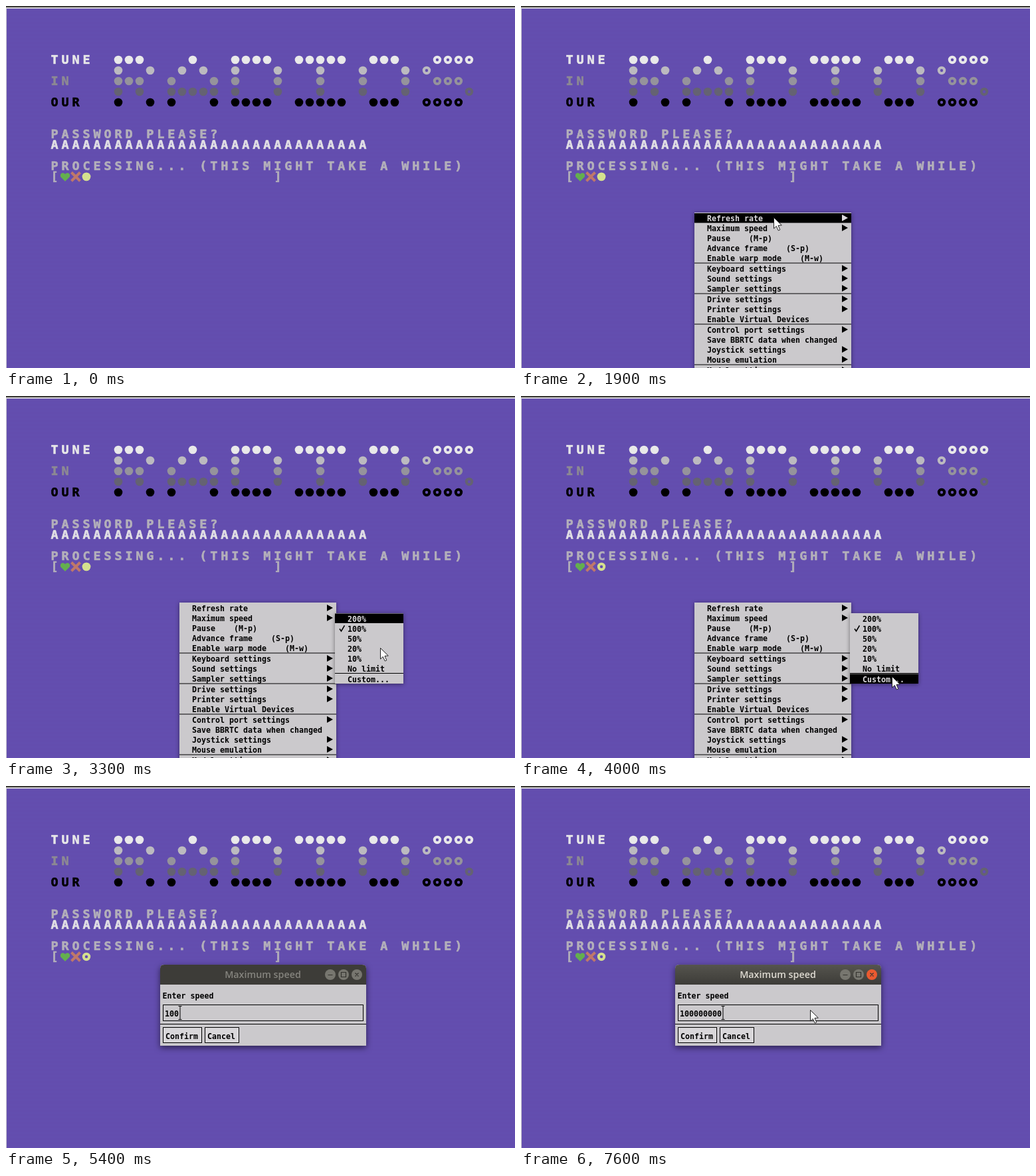
These frames come from a looping animation (766x545 px, 8000 ms). An HTML page:

```html
<!DOCTYPE html>
<html lang="en">
<head>
<meta charset="utf-8">
<title>Speed menu</title>
<style>
html, body { margin: 0; width: 100%; height: 100%; overflow: hidden; background: #6b54bd; }
svg { display: block; width: 766px; height: 545px; }
text { white-space: pre; }

.screen { filter: blur(.4px); }
.screen text {
  font: bold 18.5px "DejaVu Sans Mono", monospace;
  letter-spacing: 4.86px;
  fill: var(--c); stroke: var(--c); stroke-width: .6px;
}
.ball { fill: var(--c); }
.ring { fill: none; stroke: var(--c); stroke-width: 4px; }

.ui text { font: bold 11.63px "DejaVu Sans Mono", monospace; fill: #000; }
.ui .panel { fill: #cbc9cc; }
.ui .arrow { fill: #000; }
.ui .hot text, .ui .hot .arrow { fill: #dddbde; }
.popup > .panel { filter: drop-shadow(0 1px 3px rgba(0, 0, 0, .45)); }
.frame { filter: drop-shadow(0 3px 5px rgba(0, 0, 0, .55)); }
.line { fill: none; stroke: #000; }
.ui .title { font: 600 14.3px "Open Sans", sans-serif; text-anchor: middle; }

/* Every change is a hard step; the small lead keeps frames clear of the edges. */
.popup, .hot, .dot, .pointer, .dialog, .caret, .title, .bar, .close {
  animation: 8s step-end -10ms infinite;
}
.menu { animation-name: menu; }
.submenu { animation-name: submenu; }
.dot { animation-name: dot; }
.pointer { animation-name: pointer; }
.dialog { animation-name: dialog; }
.caret { animation-name: caret; }
.title { animation-name: title; }
.bar { animation-name: bar; }
.close { animation-name: close; }

@keyframes menu {
  0%, 53.75%, 100% { opacity: 0; }
  6.25% { opacity: .25; }
  7.5% { opacity: .5; }
  8.75% { opacity: .75; }
  10% { opacity: 1; }
}
@keyframes submenu { 0%, 53.75%, 100% { opacity: 0; } 30% { opacity: 1; } }
@keyframes hot-refresh { 0%, 25%, 100% { opacity: 0; } 23.75% { opacity: 1; } }
@keyframes hot-speed { 0%, 36.25%, 100% { opacity: 0; } 25% { opacity: 1; } }
@keyframes hot-200 { 0%, 42.5%, 100% { opacity: 0; } 36.25% { opacity: 1; } }
@keyframes hot-10 { 0%, 43.75%, 100% { opacity: 0; } 42.5% { opacity: 1; } }
@keyframes hot-custom { 0%, 45%, 53.75%, 100% { opacity: 0; } 43.75%, 47.5% { opacity: 1; } }
@keyframes dot { 0% { opacity: 1; } 48.75%, 100% { opacity: 0; } }
@keyframes dialog { 0% { opacity: 0; } 67.5%, 100% { opacity: 1; } }
@keyframes title { 0% { fill: #85847e; } 68.75%, 100% { fill: #dfdbd2; } }
@keyframes bar { 0% { fill: #3d3c38; } 68.75%, 100% { fill: url(#active); } }
@keyframes close { 0% { fill: #77766f; } 68.75%, 100% { fill: #ea5a30; } }
@keyframes caret {
  0% { transform: none; }
  87.5% { transform: translateX(7px); }
  90% { transform: translateX(14px); }
  91.25% { transform: translateX(21px); }
  92.5% { transform: translateX(28px); }
  93.75% { transform: translateX(35px); }
  95%, 100% { transform: translateX(42px); }
}
@keyframes pointer {
  0% { opacity: 0; transform: translate(378px, 310px); }
  6.25% { opacity: 1; transform: translate(378px, 310px); }
  16.25% { transform: translate(377px, 308px); }
  23.75% { transform: translate(380px, 318px); }
  25% { transform: translate(385px, 333px); }
  26.25% { transform: translate(389px, 345px); }
  35% { transform: translate(430px, 349px); }
  36.25% { transform: translate(505px, 345px); }
  37.5% { transform: translate(552px, 363px); }
  41.25% { transform: translate(563px, 379px); }
  42.5% { transform: translate(562px, 400px); }
  43.75% { transform: translate(560px, 420px); }
  45% { transform: translate(559px, 433px); }
  47.5% { transform: translate(559px, 430px); }
  48.75% { transform: translate(558px, 426px); }
  50% { transform: translate(558px, 422px); }
  60% { transform: translate(575px, 389px); }
  61.25% { opacity: 0; }
  72.5% { opacity: 1; transform: translate(551px, 204px); }
  73.75% { transform: translate(516px, 252px); }
  75% { transform: translate(475px, 300px); }
  76.25% { transform: translate(450px, 326px); }
  78.75%, 100% { opacity: 1; transform: translate(435px, 337px); }
}
</style>
</head>
<body>
<svg viewBox="0 0 766 545" xmlns="http://www.w3.org/2000/svg">
  <defs>
    <pattern id="scan" width="2" height="2" patternUnits="userSpaceOnUse">
      <rect y="1" width="2" height="1" fill="#000" fill-opacity=".15"/>
    </pattern>
    <linearGradient id="active" x2="0" y2="1">
      <stop stop-color="#55544e"/><stop offset="1" stop-color="#3d3c38"/>
    </linearGradient>
  </defs>

  <rect width="766" height="545" fill="#6b54bd"/>
  <g class="screen" id="screen"></g>
  <rect width="766" height="545" fill="url(#scan)"/>
  <path d="M0 2H766V4H1V545H0Z" fill="#cfcdd2"/>
  <rect width="766" height="2" fill="#3c3b37"/>

  <g class="ui popup menu" id="menu"><rect class="panel" x="261" y="311" width="236" height="250"/></g>
  <g class="ui popup submenu" id="submenu">
    <rect class="panel" x="495" y="327" width="103" height="106"/>
    <path class="line" d="M502 350.500L504.500 354L509.500 345.500" stroke-width="1.500"/>
  </g>

  <g class="ui dialog">
    <path class="frame panel" d="M232 275q0-6 6-6H536q6 0 6 6V391H232Z"/>
    <path class="bar" d="M232 299V275q0-6 6-6H536q6 0 6 6V299Z"/>
    <text class="title" x="386.500" y="289">Maximum speed</text>
    <g fill="#77766f">
      <circle cx="488" cy="284" r="8"/>
      <circle cx="508" cy="284" r="8"/>
      <circle class="close" cx="528" cy="284" r="8"/>
    </g>
    <path d="M484.500 284.500H491.500M504.500 280.500h7v7h-7zM525.500 281.500l5 5m0-5l-5 5" fill="none" stroke="#34332f" stroke-width="1.200"/>
    <text x="235.500" y="320">Enter speed</text>
    <text x="239" y="347">100000000</text>
    <g class="caret">
      <rect class="panel" x="260" y="332" width="46" height="20"/>
      <path class="line" d="M259.500 331.500H264.500M262 331.500V351.500M259.500 351.500H264.500"/>
    </g>
    <rect class="line" x="236.500" y="329.500" width="301" height="24"/>
    <path class="line" d="M232 358.500H542"/>
    <g fill="#d9d7da" stroke="#000">
      <rect x="236.500" y="363.500" width="58" height="23"/>
      <rect x="299.500" y="363.500" width="51" height="23"/>
    </g>
    <text x="240" y="381">Confirm</text>
    <text x="303" y="381">Cancel</text>
  </g>

  <path class="pointer" d="M.5.500V17L4.300 13.500L7.300 20L9.800 18.900L7 12.500L12.300 12Z" fill="#fff" stroke="#222" stroke-linejoin="round"/>
</svg>
<script>
const CELL = 16, LEFT = 65, TOP = 73;
const add = (id, markup) => document.getElementById(id).insertAdjacentHTML('beforeend', markup);

// Character screen: col and row count cells of 16 pixels.
const centre = (col, row) => [LEFT + CELL * (col + .5), TOP + CELL * (row + .5)];
const write = (col, row, color, text) =>
  add('screen', `<text style="--c:${color}" x="${LEFT + 2.4 + CELL * col}" y="${TOP + 14 + CELL * row}">${text}</text>`);
const disc = (col, row, color, kind, extra = '') => {
  const [x, y] = centre(col, row);
  add('screen', `<circle class="${kind} ${extra}" style="--c:${color}" cx="${x}" cy="${y}" r="${kind === 'ring' ? 4.2 : 6.3}"/>`);
};

const shades = ['#fcfcfc', '#cbc9cf', '#a19fa8', '#6d6a7c', '#000'];
const banner = [
  '###    #   ####  #####  ###   oooo',
  '#  #  # #  #   #   #   #   # o    ',
  '###  #   # #   #   #   #   #  ooo ',
  '# #  ##### #   #   #   #   #     o',
  '#  # #   # ####  #####  ###  oooo '
];
banner.forEach((line, row) => [...line].forEach((ch, i) => {
  if (ch !== ' ') disc(i + 6, row, shades[row], ch === 'o' ? 'ring' : 'ball');
}));
write(0, 0, shades[0], 'TUNE');
write(0, 2, '#98949f', 'IN');
write(0, 4, shades[4], 'OUR');

const grey = '#c2bec9';
write(0, 7, grey, 'PASSWORD PLEASE?');
write(0, 8, '#f4f2f7', 'A'.repeat(30));
write(0, 10, grey, 'PROCESSING... (THIS MIGHT TAKE A WHILE)');
write(0, 11, grey, '[');
write(21, 11, grey, ']');
add('screen', `
  <path fill="#6cbd55" d="M89 264L82 257V253.500Q85 249.500 89 253Q93 249.500 96 253.500V257Z"/>
  <path stroke="#cf8272" stroke-width="4" d="M98.500 250.500L111.500 263.500M111.500 250.500L98.500 263.500"/>`);
const yellow = '#e6f29a';
disc(3, 11, yellow, 'ring');
disc(3, 11, yellow, 'ball', 'dot');

// Menus: '-' is a rule, a trailing '>' opens a submenu, hot maps labels to highlight tracks.
function fill(id, x, y, width, indent, items, hot) {
  for (const item of items) {
    if (item === '-') {
      add(id, `<rect x="${x}" y="${y - .5}" width="${width}" height="1"/>`);
      y++;
      continue;
    }
    const label = item.replace('>', '');
    const row = `<text x="${x + indent}" y="${y + 12}">${label}</text>` +
      (item === label ? '' : `<path class="arrow" d="M${x + 222} ${y + 2}l9 5l-9 5z"/>`);
    add(id, row);
    if (hot[label]) add(id, `<g class="hot" style="animation-name:hot-${hot[label]}">
      <rect x="${x}" y="${y}" width="${width}" height="14.500"/>${row}</g>`);
    y += 15;
  }
}
fill('menu', 261, 312, 236, 19, [
  'Refresh rate>', 'Maximum speed>', 'Pause    (M-p)', 'Advance frame    (S-p)',
  'Enable warp mode    (M-w)', '-',
  'Keyboard settings>', 'Sound settings>', 'Sampler settings>', '-',
  'Drive settings>', 'Printer settings>', 'Enable Virtual Devices', '-',
  'Control port settings>', 'Save BBRTC data when changed', 'Joystick settings>', 'Mouse emulation>', '-',
  'Model settings>'
], { 'Refresh rate': 'refresh', 'Maximum speed': 'speed' });
fill('submenu', 495, 327.5, 103, 19,
  ['200%', '100%', '50%', '20%', '10%', 'No limit', '-', 'Custom...'],
  { '200%': '200', '10%': '10', 'Custom...': 'custom' });
</script>
</body>
</html>
```
